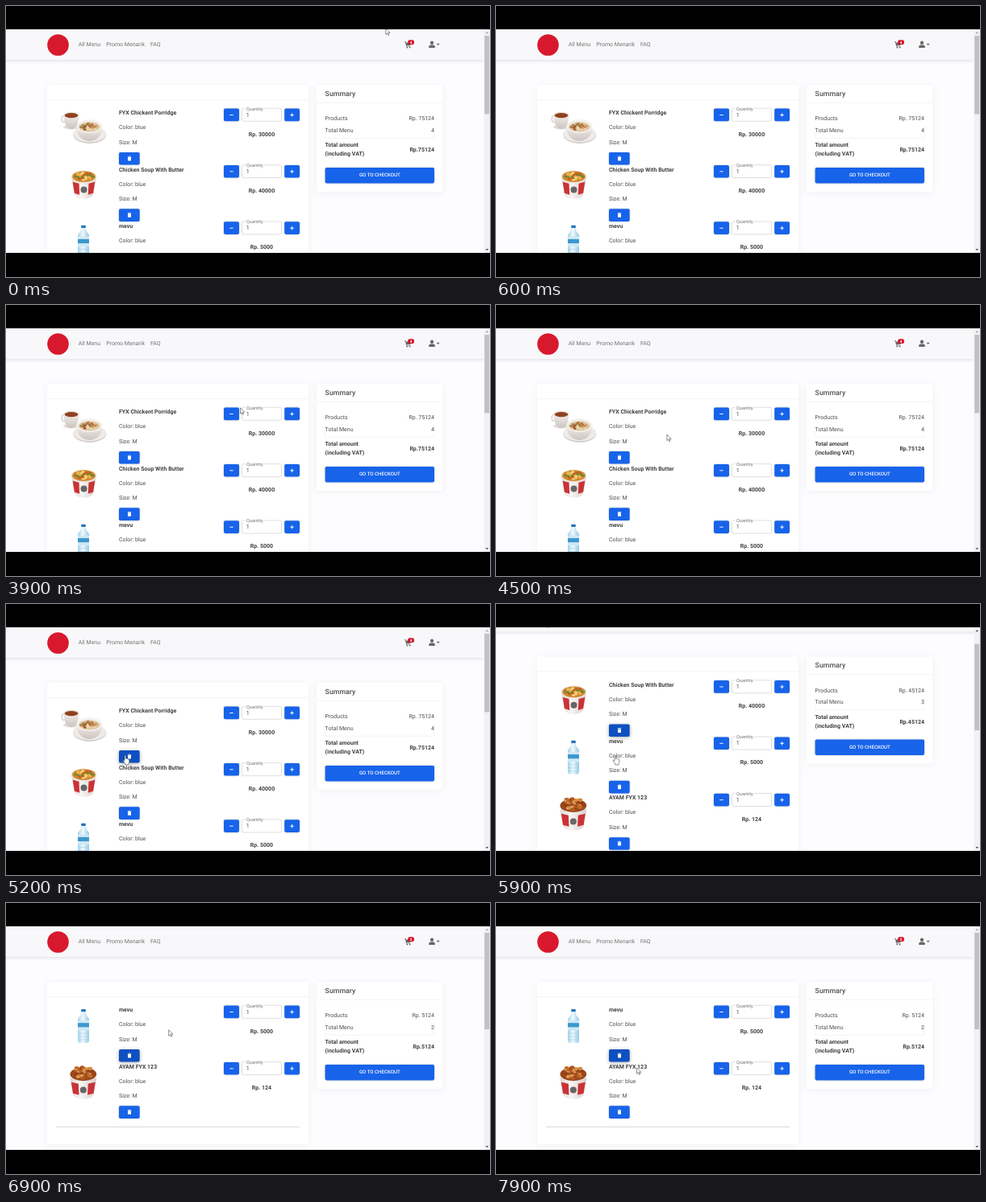
Animation of 600 by 337 pixels, one loop 8 s. Source, as an HTML page:

```html
<!DOCTYPE html>
<html lang="en">
<head>
<meta charset="utf-8">
<title>Shopping cart</title>
<style>
  html, body { margin: 0; width: 100%; height: 100%; overflow: hidden; background: #000; }
  svg { display: block; width: 100vw; height: 100vh; }
  text { font: 7.03px Roboto, sans-serif; fill: #4f4f4f; text-rendering: geometricPrecision; white-space: pre; transform: translateY(-.35px); }
  .strong { font-weight: 700; fill: #404040; }
  .nav { fill: #757575; }
  .heading { font-size: 8.78px; font-weight: 500; }
  .label { font-size: 5.6px; fill: #757575; }
  .action { font-size: 6.15px; font-weight: 500; fill: #fff; }
  .badge { font-size: 4.6px; font-weight: 700; fill: #fff; }
  .card { fill: #fff; filter: drop-shadow(0 1.5px 4px rgba(0, 0, 0, .055)); }
  .bar { fill: #f8f7f9; filter: drop-shadow(0 1px 2px rgba(0, 0, 0, .13)); }
  .button { fill: #1763ea; filter: drop-shadow(0 .9px 1.2px rgba(0, 0, 0, .22)); }
  .button.held { fill: #0e50c0; filter: drop-shadow(0 1.8px 2.5px rgba(0, 0, 0, .32)); }
  .rule { fill: none; stroke: #ececee; stroke-width: .6; }
  .sign { fill: none; stroke: #fff; stroke-width: .95; }
</style>
</head>
<body>
<svg viewBox="0 0 600 337" preserveAspectRatio="none">
  <defs>
    <clipPath id="view"><rect y="29" width="600" height="278"/></clipPath>
    <linearGradient id="water">
      <stop offset="0" stop-color="#9fd0e8"/><stop offset=".45" stop-color="#f2fafd"/><stop offset="1" stop-color="#93c8e4"/>
    </linearGradient>
    <linearGradient id="china" x2="0" y2="1">
      <stop offset="0" stop-color="#f3eeea"/><stop offset="1" stop-color="#cbc3bf"/>
    </linearGradient>
    <linearGradient id="paper">
      <stop offset="0" stop-color="#dcd5d2"/><stop offset=".4" stop-color="#f8f5f3"/><stop offset="1" stop-color="#d6cecb"/>
    </linearGradient>
  </defs>
  <g clip-path="url(#view)">
    <rect y="29" width="600" height="278" fill="#fdfcfe"/>
    <g id="page"></g>
    <rect x="592.5" y="29" width="7.5" height="278" fill="#f1f1f1"/>
    <path id="up" d="M594.5 34.2l1.8-2.2 1.8 2.2z"/>
    <path d="M594.5 302l1.8 2.2 1.8-2.2z" fill="#555"/>
    <rect id="thumb" x="593.2" width="6" fill="#c1c1c1"/>
    <g id="cursor" stroke="#333" stroke-width=".55" fill="#fff" stroke-linejoin="round">
      <path id="arrow" d="M0 0V7.4L1.7 5.8 2.9 8.5 4.1 8 2.9 5.4H5.3z"/>
      <path id="hand" d="M-.8 .6Q0-.5 .8 .6V4Q1.8 3.4 2.3 4.3 3.3 3.8 3.7 4.7 4.8 4.4 5 5.4V8Q5 9.4 4.2 10.2V11.6H.1V10.4L-2.6 6.9Q-2.6 5.5-1.5 5.9L-.8 6.8z"/>
    </g>
  </g>
</svg>
<script>
const LOOP = 8000, STEP = 100, ROW = 70.35, TRACK = 262, VIEW = 278;
const byId = id => document.getElementById(id);

const rect = (x, y, w, h, attrs = '') => `<rect x="${x}" y="${y}" width="${w}" height="${h}" ${attrs}/>`;
const oval = (x, y, rx, ry, fill) => `<ellipse cx="${x}" cy="${y}" rx="${rx}" ry="${ry}" fill="${fill}"/>`;
const path = (d, fill, attrs = '') => `<path d="${d}" fill="${fill}" ${attrs}/>`;
const rule = d => `<path class="rule" d="${d}"/>`;
const text = (x, y, str, cls = '', anchor = 'start', id = '') =>
  `<text x="${x}" y="${y}" class="${cls}" text-anchor="${anchor}" ${id && `id="${id}"`}>${str}</text>`;
const button = (x, y, w, h, cls = '') => rect(x, y, w, h, `rx="1.8" class="button ${cls}"`);

// Small morsels spread inside an ellipse by the golden angle
const morsels = (cx, cy, rx, ry, count, size, colors) =>
  Array.from({ length: count }, (_, i) => {
    const r = Math.sqrt((i + .5) / count), a = i * 2.4;
    return oval(cx + rx * r * Math.cos(a), cy + ry * r * Math.sin(a), size, size * .75, colors[i % colors.length]);
  }).join('');

// Round paper tub with a red panel on each side of its badge
const tub = (cx, top, bottom, half) => {
  const foot = half - 4, high = top + 5.5, low = bottom - 5;
  const panel = s => path(`M${cx + s * (half - 1.6)} ${high}L${cx + s * 6} ${high + 2}L${cx + s * 5.3} ${low + 2}L${cx + s * (half - 3.8)} ${low}z`, '#cb3236');
  return path(`M${cx - half} ${top}H${cx + half}L${cx + foot} ${bottom - 3}Q${cx + foot - 3} ${bottom + 2} ${cx} ${bottom + 2}Q${cx - foot + 3} ${bottom + 2} ${cx - foot} ${bottom - 3}z`, 'url(#paper)')
    + panel(-1) + panel(1)
    + `<circle cx="${cx}" cy="${(top + bottom) / 2 + 3}" r="4" fill="#666"/>`;
};

const porridge = () =>
  oval(81, 150.5, 10, 3, '#e4dcd6')
  + `<ellipse cx="71.500" cy="140.500" rx="2.3" ry="3.8" fill="none" stroke="#d8cdc5" stroke-width="1.3"/>`
  + path('M71.500 135.500Q72 152.800 81 153Q89.500 152.800 90.500 135.500z', 'url(#china)')
  + oval(81, 135.5, 9.6, 4, '#ebe2db') + oval(81, 136.1, 8.3, 3.1, '#8f4221')
  + oval(103.8, 160.3, 20.5, 10.6, '#d3cdca') + oval(103.8, 159.2, 20.2, 10, '#efebe9')
  + path('M87.500 150Q88.500 167 103.300 168Q118.500 167 119.500 150z', 'url(#china)')
  + oval(103.5, 149.7, 16, 8.5, '#f4f0ed') + oval(103.3, 150.4, 13, 6.1, '#dec6a0')
  + morsels(103, 150.3, 10, 4.4, 18, 1.75, ['#b8703a', '#ecd7ae', '#96793f', '#c98b4f', '#a4502a']);

const soup = () =>
  tub(96.5, 143, 167.5, 15.4)
  + oval(96.5, 142.3, 15.9, 8, '#eae3dc') + oval(96.5, 141.8, 14.3, 6.9, '#d3872c')
  + morsels(96.5, 141.3, 11.5, 5, 22, 1.9, ['#e8b44c', '#6e8636', '#bd611f', '#f1d181']);

const bottle = () =>
  rect(93.2, 132, 5.6, 3.4, 'rx=".8" fill="#2a74b8"')
  + path('M93.500 135.400H98.500Q99 140 102 142.500Q103.600 144 103 147V171Q102.700 174 100 174H92Q89.300 174 89 171V147Q88.400 144 90 142.500Q93 140 93.500 135.400z', 'url(#water)')
  + rect(89, 146, 14, 12.5, 'fill="#cfe8f5"') + rect(89, 149.2, 14, 5.2, 'fill="#3d98cf"')
  + `<path d="M89.500 162H102.500M89.500 166H102.500M89.500 170H102.500" stroke="#a5d3ea" stroke-width=".7"/>`;

const chicken = () =>
  tub(95.8, 147, 171.5, 16.6)
  + oval(95.8, 142.5, 16.4, 8.3, '#98481c')
  + morsels(95.8, 140.5, 13, 7.5, 22, 3, ['#c06c2c', '#9c4419', '#d48b42', '#b2591f'])
  + morsels(95.8, 140, 12, 7.5, 15, 1, ['#efc27c', '#6b2a10']);

const products = [
  { name: 'FYX Chickent Porridge', price: 30000, picture: porridge },
  { name: 'Chicken Soup With Butter', price: 40000, picture: soup },
  { name: 'mevu', price: 5000, picture: bottle },
  { name: 'AYAM FYX 123', price: 124, picture: chicken }
];

const trash = path('M151 188H155V191.800Q155 192.400 154.400 192.400H151.600Q151 192.400 151 191.800zM150.600 187.100H155.400V187.600H150.600zM152.200 186.600H153.800V187.200H152.200z', '#fff');

const productRow = ({ name, price, picture }) => `<g class="row">
  ${picture()}
  ${text(140, 135.5, name, 'strong')}${text(140, 153.6, 'Color: blue')}${text(140, 171.9, 'Size: M')}
  ${button(140, 182, 25.7, 15.6, 'remove')}${trash}
  ${button(270, 127.6, 19, 15.6)}${button(345.2, 127.6, 18.8, 15.6)}
  <path class="sign" d="M277.300 135.500H281.700M352.300 135.500H356.900M354.600 133.200V137.800"/>
  ${rect(292.5, 127.3, 49, 16, 'rx="1.8" fill="#fff" stroke="#bdbdbd" stroke-width=".5"')}
  ${rect(296.8, 126.5, 23.4, 2, 'fill="#fff"')}
  ${text(298, 129.9, 'Quantity', 'label')}${text(297.8, 138, 1)}
  ${text(317, 161.9, 'Rp. ' + price, 'strong', 'middle')}
</g>`;

const cart = path('M494 44.300H495.700L496 45.500H502.300L501.300 49H496.700L496.900 49.800H501.300V50.600H496.200L495 45.100H494z', '#666')
  + oval(497.3, 51.6, .9, .9, '#666') + oval(500.7, 51.6, .9, .9, '#666');
const user = oval(528, 45.8, 2.1, 2.2, '#666')
  + path('M524.200 52V50.700Q524.200 48.500 526.500 48.500H529.500Q531.800 48.500 531.800 50.700V52z', '#666');

byId('page').innerHTML =
  rect(-5, 20, 598, 47, 'class="bar"')
  + '<circle cx="64.500" cy="48.500" r="13.300" fill="#d8192d"/>'
  + text(89.8, 50.5, 'All Menu', 'nav') + text(124.2, 50.5, 'Promo Menarik', 'nav') + text(179, 50.5, 'FAQ', 'nav')
  + cart + rect(498.2, 42.2, 7.8, 5.7, 'rx="2.2" fill="#d4142e"') + text(502.1, 47, '', 'badge', 'middle', 'badge')
  + user + path('M533.600 46.800H537.700L535.650 48.900z', '#666')
  + rect(51, 98, 324, 0, 'rx="3.5" class="card" id="list"') + rule('M51 116.500H375')
  + products.map(productRow).join('')
  + '<path id="end" d="M62 0H364" stroke="#cbcbcd" stroke-width=".7"/>'
  + rect(385, 98, 156.5, 133, 'rx="3.5" class="card"') + rule('M385 120.200H541.500')
  + text(395.6, 112.3, 'Summary', 'heading')
  + text(395.6, 142.6, 'Products') + text(531, 142.6, '', '', 'end', 'subtotal')
  + rule('M395.700 149V164.200H531V149')
  + text(395.6, 157.2, 'Total Menu') + text(531, 157.2, '', '', 'end', 'count')
  + text(395.6, 175.7, 'Total amount', 'strong') + text(395.6, 186.7, '(including VAT)', 'strong')
  + text(531, 181.6, '', 'strong', 'end', 'total')
  + button(395.6, 201, 135.4, 19.4) + text(463.3, 212.8, 'GO TO CHECKOUT', 'action', 'middle');

const rows = [...document.querySelectorAll('.row')];

// Tables of [time, values...]
const pointer = [[2900, 557.5, 135.2], [3300, 557, 136], [3900, 290.5, 127.8], [4100, 276, 134], [4900, 147.8, 188.3],
  [6000, 147.8, 188.3], [6500, 152, 150], [6700, 152, 150], [6900, 201.7, 157.8], [7500, 190, 182], [7900, 174.6, 205]];
const scrolling = [[5700, 0], [6000, 43.9], [6700, 43.9], [6800, 0]];
const removals = [5400, 6700];
const firstHold = 4900, handEnd = 6800;

function sample(table, t) {
  const next = table.findIndex(row => row[0] > t);
  if (next === 0) return table[0].slice(1);
  if (next < 0) return table.at(-1).slice(1);
  const a = table[next - 1], b = table[next], k = (t - a[0]) / (b[0] - a[0]);
  const eased = k * k * (3 - 2 * k);
  return a.slice(1).map((v, i) => v + (b[i + 1] - v) * eased);
}

let shown = -1;
function showCart(removed) {
  if (removed === shown) return;
  shown = removed;
  const left = products.length - removed;
  const sum = products.slice(removed).reduce((s, p) => s + p.price, 0);
  const end = 137.8 + left * ROW;
  rows.forEach((row, i) => {
    row.style.display = i < removed ? 'none' : '';
    row.setAttribute('transform', `translate(0 ${(i - removed) * ROW})`);
  });
  byId('list').setAttribute('height', end + 21.5 - 98);
  byId('end').setAttribute('transform', `translate(0 ${end})`);
  byId('badge').textContent = byId('count').textContent = left;
  byId('subtotal').textContent = 'Rp. ' + sum;
  byId('total').textContent = 'Rp.' + sum;
}

function draw(t) {
  const removed = removals.filter(at => t >= at).length;
  showCart(removed);
  rows.forEach((row, i) => row.querySelector('.remove').classList.toggle('held', t >= firstHold && i === removed));

  const [scroll] = sample(scrolling, t);
  const content = 466.3 + (products.length - removed) * ROW;
  byId('page').setAttribute('transform', `translate(0 ${-scroll})`);
  byId('thumb').setAttribute('y', 37 + scroll * TRACK / content);
  byId('thumb').setAttribute('height', TRACK * VIEW / content);
  byId('up').setAttribute('fill', scroll ? '#555' : '#a5a5a5');

  const [x, y] = t < 600 ? [470.8, 28] : sample(pointer, t);
  const hand = t >= firstHold && t < handEnd;
  byId('cursor').style.display = t >= 600 && t < 2900 ? 'none' : '';
  byId('cursor').setAttribute('transform', `translate(${x} ${y})`);
  byId('hand').style.display = hand ? '' : 'none';
  byId('arrow').style.display = hand ? 'none' : '';
}

const start = performance.now();
function tick() {
  const t = (performance.now() - start) % LOOP;
  draw(Math.floor(t / STEP) * STEP);
  requestAnimationFrame(tick);
}
tick();
</script>
</body>
</html>
```
